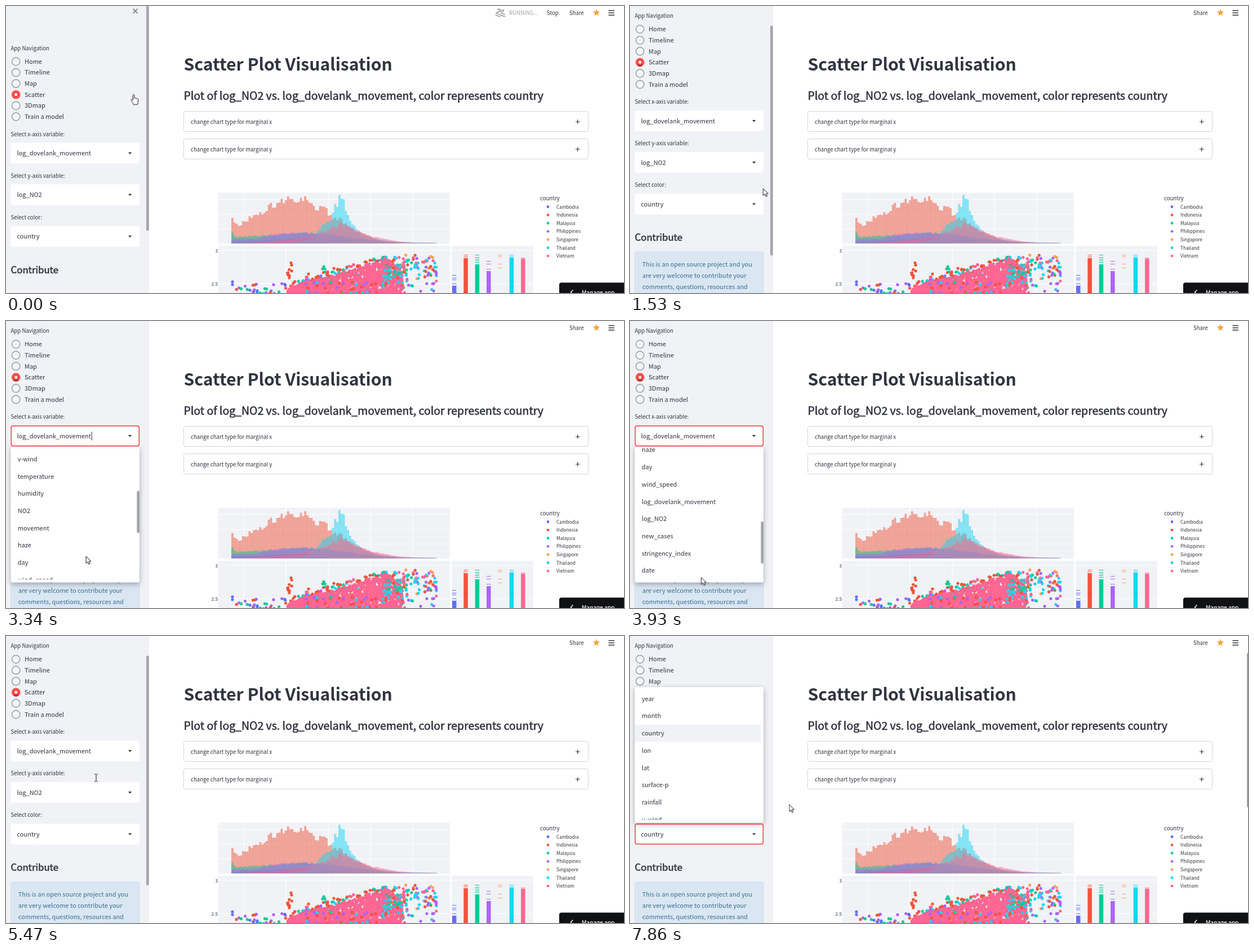
Write an HTML page with a canvas that moves like this. It is 1097 px wide and 511 px high and loops after 7990 ms.

```html
<!DOCTYPE html>
<html lang="en">
<head>
<meta charset="utf-8">
<title>Scatter Plot Visualisation</title>
<style>
html, body { margin: 0; width: 100%; height: 100%; overflow: hidden; background: #fff; }
canvas, svg { position: absolute; left: 0; top: 0; width: 1097px; height: 511px; }
text {
  font-family: "Noto Sans CJK JP", "Noto Sans CJK SC", "Noto Sans CJK", "Source Sans Pro", Lato, sans-serif;
  font-size: 11px; fill: #31333f;
}
.small { font-size: 9.62px; }
.tiny { font-size: 8.24px; }
.title { font-size: 30.1px; font-weight: 700; }
.sub { font-size: 19.46px; stroke: #31333f; stroke-width: .6px; }
.head { font-size: 16.8px; stroke: #31333f; stroke-width: .5px; }
.note { fill: #35718f; }
.thumb { fill: #a5a6ac; }
.pop { filter: drop-shadow(0 3px 5px rgba(0, 0, 0, .3)); }

/* Motion */
.pan, .list, .cursor { animation: 7.99s linear infinite; }
.pan { animation-name: pan; }
.list { animation-name: list; }
.cursor { animation-name: cursor; }
.sideThumb { animation: sideThumb 7.99s linear infinite, sideHover 7.99s step-end infinite; }
.listThumb { animation: listThumb 7.99s linear infinite, listHover 7.99s step-end infinite; }
.mainThumb, .running, .info, .press, .mark, .openX, .openC, .caretX, .caretC, .hand, .arrow, .beam {
  animation: 7.99s step-end infinite;
}
.mainThumb { animation-name: mainHover; }
.running { animation-name: running; }
.info { animation-name: info; }
.press { animation-name: press; }
.mark { animation-name: mark; }
.openX { animation-name: openX; }
.openC { animation-name: openC; }
.caretX { animation-name: caretX; }
.caretC { animation-name: caretC; }
.hand { animation-name: hand; }
.arrow { animation-name: arrow; }
.beam { animation-name: beam; }

@keyframes pan {
  0%, 11.51% { transform: none; }
  14.02% { transform: translateY(-36px); }
  15.27% { transform: translateY(-53px); }
  16.65%, 100% { transform: translateY(-57.5px); }
}
@keyframes list {
  0%, 36.8% { transform: none; }
  45.3%, 100% { transform: translateY(-414.3px); }
}
@keyframes sideThumb {
  0%, 11.51% { y: 0px; height: 400px; }
  14.02% { y: 0px; height: 404px; }
  16.65%, 100% { y: 35px; height: 409px; }
}
@keyframes listThumb {
  0%, 36.8% { transform: none; }
  45.3%, 100% { transform: translateY(133px); }
}
@keyframes sideHover {
  0%, 9.9%, 53.8% { opacity: 1; }
  7.3%, 36%, 92.9%, 100% { opacity: 0; }
}
@keyframes listHover { 0%, 53.8%, 100% { opacity: 0; } 36% { opacity: 1; } }
@keyframes mainHover { 0%, 9.9% { opacity: 0; } 7.3%, 92.9%, 100% { opacity: 1; } }
@keyframes running { 0% { opacity: 1; } 1.63% { opacity: .5; } 2.75%, 100% { opacity: 0; } }
@keyframes info { 0% { opacity: 0; } 2.75%, 100% { opacity: 1; } }
@keyframes press { 0%, 15.27%, 100% { opacity: 0; } 12.64% { opacity: 1; } }
@keyframes mark { 0% { opacity: 0; } 15.27%, 100% { opacity: 1; } }
@keyframes openX { 0%, 60.7%, 100% { opacity: 0; } 27.91% { opacity: 1; } }
@keyframes openC { 0% { opacity: 0; } 81.98%, 100% { opacity: 1; } }
@keyframes caretX {
  0%, 34.17%, 46.7%, 60.7%, 100% { opacity: 0; }
  27.91%, 40.4%, 52.9% { opacity: 1; }
}
@keyframes caretC { 0%, 88.6%, 100% { opacity: 0; } 81.98% { opacity: 1; } }
@keyframes hand {
  0%, 22.5%, 77% { opacity: 1; }
  5.63%, 35%, 91.7%, 100% { opacity: 0; }
}
@keyframes arrow {
  0%, 22.5%, 67.3%, 77% { opacity: 0; }
  5.63%, 35%, 74%, 91.7%, 100% { opacity: 1; }
}
@keyframes beam { 0%, 74%, 100% { opacity: 0; } 67.3% { opacity: 1; } }
@keyframes cursor {
  0%, 4.13% { transform: translate(226.6px, 157.5px); }
  7.63% { transform: translate(268px, 230px); }
  9.01% { transform: translate(262px, 300px); }
  10.26% { transform: translate(246px, 345px); }
  11.51% { transform: translate(245px, 347px); }
  14.02% { transform: translate(242.5px, 371px); }
  15.27% { transform: translate(243px, 384px); }
  16.65% { transform: translate(243px, 386px); }
  23.9% { transform: translate(224px, 210px); }
  26.28%, 34.17% { transform: translate(223.5px, 205.5px); }
  35.54% { transform: translate(215px, 235px); }
  40.05% { transform: translate(150px, 400px); }
  45.3%, 49.8% { transform: translate(126.5px, 456.5px); }
  53.8% { transform: translate(190px, 260px); }
  55.2% { transform: translate(205px, 215px); }
  56.95% { transform: translate(175px, 131px); }
  58.7%, 61.3% { transform: translate(165px, 118px); }
  67.6%, 69.5% { transform: translate(160px, 252.5px); }
  72.6% { transform: translate(130px, 275px); }
  78.5% { transform: translate(215px, 330px); }
  80.1%, 90.5% { transform: translate(225.5px, 349px); }
  92.6% { transform: translate(250px, 320px); }
  96.4%, 100% { transform: translate(282.5px, 300px); }
}
</style>
</head>
<body>
<canvas id="plot" width="1097" height="511"></canvas>
<svg id="stage" viewBox="0 0 1097 511">
  <g id="page"></g>
  <rect class="mainThumb thumb" x="1095" y="30" width="3" height="275" rx="1.5"/>
  <rect width="254" height="511" fill="#f0f2f6"/>
  <g id="side" class="pan"></g>
  <rect class="sideThumb thumb" x="249" y="0" width="4.7" height="400" rx="2"/>
  <g id="pops"></g>
  <g class="cursor" stroke="#111" stroke-width="1" stroke-linejoin="round" fill="#fff">
    <path class="hand" transform="translate(-4.8 0)" d="M3.5 10V1.5a1.3 1.3 0 0 1 2.6 0V7c.3-1 2.4-.8 2.5.4.5-.8 2.2-.6 2.4.6.6-.6 1.9-.2 1.9 1V12c0 2-1 3.6-1.2 6H4.6C4 15 1.5 12.5.4 10.2c-.5-1.4 1.2-2 3.1-.2Z"/>
    <path class="arrow" d="M0 0V12.5L3 9.8 5 14.2 7 13.3 5.1 9H9Z"/>
    <path class="beam" fill="none" d="M-3-6.5H-1L0-5.5 1-6.5H3M0-5.5V5.5M-3 6.5H-1L0 5.5 1 6.5H3"/>
  </g>
</svg>
<script>
const $ = id => document.getElementById(id);
const colors = ['#636efa', '#ef553b', '#00cc96', '#ab63fa', '#ffa15a', '#19d3f3', '#ff6692'];
const metric = 'log_dovelank_movement';

function add(parent, tag, attrs, content) {
  const el = document.createElementNS('http://www.w3.org/2000/svg', tag);
  for (const key in attrs) el.setAttribute(key, attrs[key]);
  if (content) el.textContent = content;
  parent.appendChild(el);
  return el;
}
const text = (parent, x, y, content, cls = '', more = {}) =>
  add(parent, 'text', { x, y, class: cls, ...more }, content);
const box = (parent, x, y, width, height, more = {}) =>
  add(parent, 'rect', { x, y, width, height, ...more });
const line = (parent, d, stroke, width = 1, more = {}) =>
  add(parent, 'path', { d, stroke, 'stroke-width': width, fill: 'none', ...more });
const dot = (parent, cx, cy, r, fill, more = {}) =>
  add(parent, 'circle', { cx, cy, r, fill, ...more });

// Header and main column
const page = $('page');
const run = add(page, 'g', { class: 'running' });
dot(run, 882, 8, 1.9, '#a0a1a8');
line(run, 'M872 6.5L876 5.5 880 11.5M870 12.5L877 9', '#a0a1a8', 2);
line(run, 'M869 14q2.2-2 4.3 0t4.3 0 4.3 0 4.3 0M869 17.6q2.2-2 4.3 0t4.3 0 4.3 0 4.3 0', '#a0a1a8', 1.5);
text(run, 893, 15.6, 'RUNNING...', 'small', { style: 'fill:#a0a1a8' });
text(run, 960, 15.6, 'Stop', 'small');
text(page, 1000, 15.6, 'Share', 'small');
const star = [...Array(10).keys()].map(i => {
  const a = i * Math.PI / 5, r = i % 2 ? 3 : 6.4;
  return (1048 + r * Math.sin(a)).toFixed(2) + ',' + (12 - r * Math.cos(a)).toFixed(2);
});
add(page, 'polygon', { points: star.join(' '), fill: '#f5a63c' });
line(page, 'M1069.5 8.2h10.5M1069.5 12.2h10.5M1069.5 16.2h10.5', '#31333f', 1.6);

text(page, 315.5, 114.5, 'Scatter Plot Visualisation', 'title');
text(page, 315.5, 167, `Plot of log_NO2 vs. ${metric}, color represents country`, 'sub');
['x', 'y'].forEach((axis, i) => {
  const y = 187.5 + 49 * i;
  box(page, 315.5, y, 718, 36, { rx: 3, fill: '#fff', stroke: '#d3d4d8' });
  text(page, 328, y + 22.1, 'change chart type for marginal ' + axis, 'small');
  line(page, `M1011 ${y + 18.5}h7.6M1014.8 ${y + 14.7}v7.6`, '#31333f', 1.2);
});

text(page, 376, 438.5, '3', 'tiny', { 'text-anchor': 'end' });
text(page, 376, 498, '2.5', 'tiny', { 'text-anchor': 'end' });
text(page, 948, 346, 'country', 'small');
['Cambodia', 'Indonesia', 'Malaysia', 'Philippines', 'Singapore', 'Thailand', 'Vietnam'].forEach((name, i) => {
  const y = 357.5 + 14.6 * i;
  dot(page, 962, y, 2.4, colors[i]);
  text(page, 977, y + 3.1, name, 'tiny');
});
box(page, 982, 492.5, 120, 24, { rx: 4, fill: '#101114' });
line(page, 'M1006.5 505.5l-4 4 4 4', '#fff', 1.4);
text(page, 1022, 513.6, 'Manage app', '', { style: 'fill:#fff;font-size:10.3px;stroke:#fff;stroke-width:.2px' });

// Sidebar
const side = $('side');
line(side, 'M225.5 5l8 8M233.5 5l-8 8', '#8c8e96', 2);
text(side, 8.5, 78.5, 'App Navigation', 'small');
['Home', 'Timeline', 'Map', 'Scatter', '3Dmap', 'Train a model'].forEach((name, i) => {
  const y = 98.8 + 19.65 * i;
  if (name === 'Scatter') {
    dot(side, 17.7, y, 7.8, '#ff4b4b');
    dot(side, 17.7, y, 7.8, '#41434e', { class: 'press' });
    dot(side, 17.7, y, 2.4, '#fff');
    line(side, `M14 ${y + 4.5}q3.7 3 7.4 0`, '#5b3540', 2, { class: 'mark' });
  } else {
    dot(side, 17.7, y, 7.1, '#f4f5f8', { stroke: '#9b9da5', 'stroke-width': 1.5 });
  }
  text(side, 33, y + 4, name);
});
[['Select x-axis variable:', metric], ['Select y-axis variable:', 'log_NO2'], ['Select color:', 'country']].forEach(([label, value], i) => {
  const y = 243.5 + 74.1 * i;
  text(side, 8.5, y - 11.8, label, 'small');
  box(side, 8.5, y, 228.5, 37, { rx: 3, fill: '#fff' });
  text(side, 19.5, y + 22.6, value);
  add(side, 'path', { d: `M217 ${y + 17}h6.4l-3.2 3.4z`, fill: '#31333f' });
});
text(side, 8.5, 475.5, 'Contribute', 'head');
const info = add(side, 'g', { class: 'info' });
box(info, 8.9, 495.4, 228, 120, { rx: 3, fill: '#dbe6f3', stroke: '#c8daee' });
['This is an open source project and you', 'are very welcome to contribute your', 'comments, questions, resources and']
  .forEach((row, i) => text(info, 21.7, 521.8 + 19.6 * i, row, 'note'));

// Option lists
const options = ['year', 'month', 'country', 'lon', 'lat', 'surface-p', 'rainfall', 'u-wind', 'v-wind',
  'temperature', 'humidity', 'NO2', 'movement', 'haze', 'day', 'wind_speed', metric, 'log_NO2',
  'new_cases', 'stringency_index', 'date', 'region', 'week', 'season'];

function popup(cls, top, field, picked) {
  const g = add($('pops'), 'g', { class: cls });
  box(g, 8.5, top, 228.5, 241.5, { rx: 3, fill: '#fff', class: 'pop' });
  const clip = add(g, 'clipPath', { id: cls });
  box(clip, 8.5, top + 3, 228.5, 233);
  const view = add(g, 'g', { 'clip-path': `url(#${cls})` });
  const list = add(view, 'g', {});
  options.forEach((name, i) => {
    const y = top + 20.7 + 30.7 * i;
    if (i === picked) box(list, 9, y - 15.3, 223, 30.5, { fill: '#f0f2f6' });
    text(list, 20.8, y + 4, name);
  });
  box(g, 9.2, field + .7, 227.1, 35.8, { rx: 3, fill: 'none', stroke: '#f03a3a', 'stroke-width': 1.5 });
  return { g, list };
}
const first = popup('openX', 224, 186, -1);
first.list.setAttribute('class', 'list');
box(first.g, 232.3, 224, 4.7, 75, { rx: 2, class: 'listThumb thumb' });
line(first.g, 'M152.3 197v15.5', '#31333f', 1, { class: 'caretX' });
const second = popup('openC', 91, 334, 2);
line(second.g, 'M60.5 345v15.5', '#31333f', 1, { class: 'caretC' });

// Charts
const ctx = $('plot').getContext('2d');
let seed = 41;
function rnd() {
  seed = (seed + 0x6d2b79f5) | 0;
  let n = Math.imul(seed ^ (seed >>> 15), 1 | seed);
  n = (n + Math.imul(n ^ (n >>> 7), 61 | n)) ^ n;
  return ((n ^ (n >>> 14)) >>> 0) / 4294967296;
}
const between = (a, b) => a + (b - a) * rnd();
function curve(points, x) {
  for (let i = 1; i < points.length; i++) {
    const [x0, y0] = points[i - 1], [x1, y1] = points[i];
    if (x >= x0 && x <= x1) return y0 + (y1 - y0) * (x - x0) / (x1 - x0);
  }
  return 0;
}
function fill(color, x, y, w, h) {
  ctx.fillStyle = color;
  ctx.fillRect(x, y, w, h);
}
function spot(x, y, color) {
  ctx.fillStyle = color;
  ctx.beginPath();
  ctx.arc(x, y, 2.6, 0, 7);
  ctx.fill();
}

fill('#f0f2f6', 376.5, 332.5, 411.5, 90.5);
fill('#f0f2f6', 376.5, 427, 411.5, 84);
fill('#f0f2f6', 791, 427, 144.5, 84);
for (let i = 0; i < 5; i++) {
  fill('#fff', 421.5 + 75 * i, 332, 1, 91);
  fill('#fff', 421.5 + 75 * i, 427, 1, 84);
}
for (const y of [344, 370.5, 396.5]) fill('#fff', 376, y, 412, 1);
for (const y of [434.5, 494]) {
  fill('#fff', 376, y, 412, 1);
  fill('#fff', 791, y, 145, 1);
}

// Overlaid histograms, bottom series first
const shapes = [
  [[400, 3], [450, 5], [520, 9], [580, 7], [640, 2], [700, 0]],
  [[400, 48], [404, 36], [414, 33], [425, 43], [440, 48], [456, 58], [470, 68], [485, 75], [500, 80], [506, 86], [518, 72],
    [528, 82], [540, 68], [565, 61], [576, 48], [600, 38], [615, 25], [640, 13], [670, 4], [700, 1]],
  [[400, 20], [406, 11], [440, 13], [500, 17], [530, 19], [570, 17], [620, 8], [680, 1], [700, 0]],
  [[400, 8], [440, 8], [480, 17], [520, 19], [560, 17], [600, 12], [660, 4], [765, 0]],
  [[570, 1], [620, 3], [700, 1], [765, 0]],
  [[500, 1], [535, 6], [552, 20], [560, 38], [574, 40], [580, 60], [592, 84], [600, 68], [608, 42], [618, 30], [630, 16], [655, 7], [700, 2], [765, 1]],
  [[420, 1], [470, 4], [520, 9], [560, 20], [594, 35], [620, 23], [650, 12], [690, 4], [720, 1], [765, 1]]
];
ctx.globalAlpha = .5;
shapes.forEach((points, k) => {
  for (let i = 0; i < 96; i++) {
    const x = 400 + 3.8 * i, h = curve(points, x) * between(.88, 1.08);
    fill(colors[k], x, 422.5 - h, 3.8, h);
  }
});
ctx.globalAlpha = 1;

// Point cloud
const edge = [[480, 512], [510, 500], [530, 491], [560, 484], [590, 477], [620, 468], [650, 458], [680, 453], [700, 466], [712, 500]];
const pick = set => colors[set[Math.floor(rnd() * set.length)]];
ctx.save();
ctx.beginPath();
ctx.rect(376.5, 427, 411.5, 84);
ctx.clip();
[[402, 491], [402, 496], [433, 506], [446, 507]].forEach(([x, y]) => spot(x, y, colors[0]));
for (let i = 0; i < 34; i++) spot(between(398, 510), 514 - 20 * rnd() ** 1.6, pick([0, 3, 3, 2, 1]));
for (let i = 0; i < 10; i++) spot(between(499, 508), between(456, 488), colors[1]);
for (let i = 0; i < 150; i++) {
  const x = between(505, 700);
  spot(x, curve(edge, x) + between(-9, 12), pick([1, 1, 1, 2, 3, 5, 6]));
}
[[564, 464], [562, 468], [566, 468], [537, 477], [582, 467]].forEach(([x, y], i) => spot(x, y, colors[i < 3 ? 2 : 1]));
for (let i = 0; i < 1500; i++) {
  const x = between(500, 704), y = curve(edge, x);
  spot(x, y + (516 - y) * rnd() ** .8, colors[6]);
}
for (let i = 0; i < 75; i++) spot(between(668, 712), between(446, 504), pick([5, 5, 2, 1, 6, 6]));
for (let i = 0; i < 40; i++) spot(between(530, 670), between(490, 512), pick([1, 1, 2, 3, 5]));
for (let i = 0; i < 62; i++) {
  const x = between(704, 764);
  spot(x, between(443, x < 725 ? 512 : 486), pick([5, 5, 5, 2, 1, 3, 4, 6]));
}
for (let i = 0; i < 7; i++) spot(between(728, 764), between(488, 509), pick([3, 5, 6]));
ctx.restore();

// Rug columns: loose marks above a solid part
const rugs = [
  [498, 479, 484, 487, 494], [449, 443, 446], [460, 443, 447, 450, 453, 456], [472, 454, 459, 468],
  [520, 443, 446, 459, 466], [448, 443, 446], [450, 448]
];
rugs.forEach(([solid, ...marks], i) => {
  const x = 792 + 20.35 * i;
  marks.forEach(y => fill(colors[i], x, y, 7.5, 1));
  fill(colors[i], x, solid, 7.5, 520 - solid);
});
</script>
</body>
</html>
```
